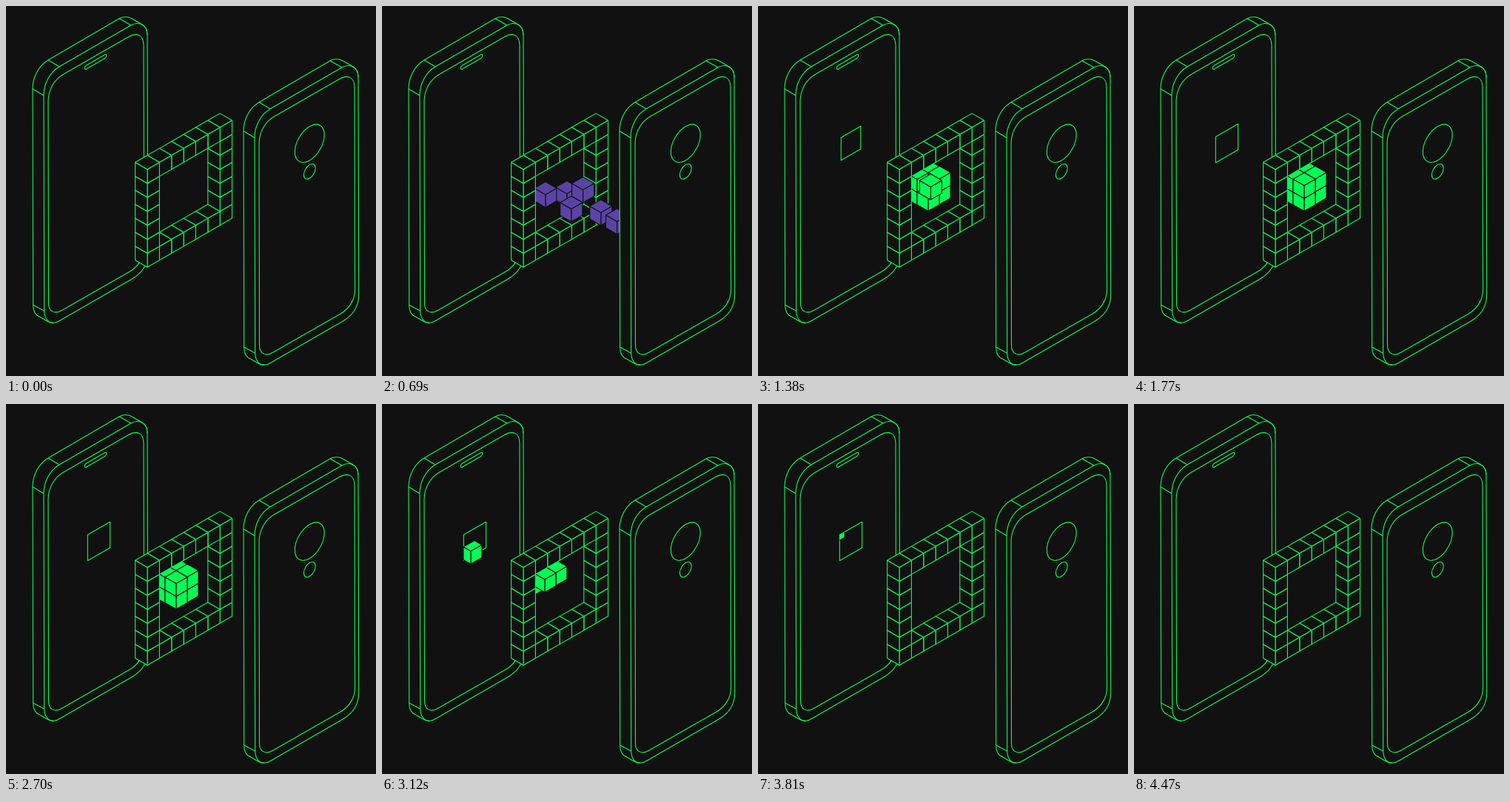
An HTML page with a canvas that plays this animation: 500 px wide and 500 px high, repeating every 4500 ms.

```html
<!DOCTYPE html>
<html lang="en">
<head>
<meta charset="utf-8">
<title>Cubes between two phones</title>
<style>
html, body { margin: 0; height: 100%; overflow: hidden; background: #111; }
canvas { display: block; width: 500px; height: 500px; }
</style>
</head>
<body>
<canvas id="stage" width="500" height="500"></canvas>
<script>
const ctx = document.getElementById('stage').getContext('2d');
const BG = '#111', GREEN = '#00ff55', PURPLE = '#5b43a6';
const LOOP = 4500, ISO = 1 / Math.sqrt(3), UNIT = 15;
const clamp = v => Math.min(1, Math.max(0, v));

const body = new Path2D('M36,112C36,96 44,81 57,73L153,17C158,14 165,14 170,17L184,25C189,28 191,33 191,39' +
  'L191.7,333C191.7,348 184,361 170,369L73,425C67,429 61,429 56,426L42,418C38,415 36.7,411 36.7,404Z');
const edges = new Path2D('M191,39C191,26 180,20 169,26L72,82C59,90 51,105 51,121L51.7,411C51.7,421 56,428 64,428' +
  'M57,73L72,82M153,17L169,26M36,112L51,121M36.7,404L51.7,412' +
  'M78,92L165,42C177,35 186,39 186,53L186.6,326C186.6,340 179,352 167,359L76,411' +
  'C66,417 57.5,413 57.5,402L57,129C57,114 65,99 78,92Z');

// column, row, layer, arrival time, arrival slowness, time of turning green, departure time, departure slowness
const cubes = [
  [1, 1, 1, 1200, 188, 1060, 2660, 151],
  [1, 1, 0, 1437, 177, 1200, 2660, 157],
  [1, 0, 1, 1467, 224, 1150, 2660, 186],
  [1, 0, 0, 1480, 169, 960, 2650, 218],
  [0, 1, 1, 942, 139, 940, 2660, 101],
  [0, 1, 0, 1264, 194, 1080, 2650, 153],
  [0, 0, 1, 1413, 167, 1180, 2660, 170],
  [0, 0, 0, 1730, 234, 1350, 2604, 239.5]
];

function face(fill, stroke, ...points) {
  ctx.beginPath();
  points.forEach(([x, y]) => ctx.lineTo(x, y));
  ctx.closePath();
  ctx.fillStyle = fill;
  ctx.strokeStyle = stroke;
  ctx.fill();
  ctx.stroke();
}

// (x, y) is the top corner of the near vertical edge
function box(x, y, w, depth, fill, stroke) {
  const k = w * ISO, e = 2 * k, bx = x - w * depth, by = y - k * depth;
  face(fill, stroke, [x, y], [x + w, y - k], [x + w, y - k + e], [x, y + e]);
  face(fill, stroke, [x, y], [bx, by], [bx, by + e], [x, y + e]);
  face(fill, stroke, [x, y], [x + w, y - k], [bx + w, by - k], [bx, by]);
}

function phone(x, y) {
  ctx.save();
  ctx.translate(x, y);
  ctx.fillStyle = BG;
  ctx.strokeStyle = GREEN;
  ctx.fill(body);
  ctx.stroke(body);
  ctx.stroke(edges);
  ctx.restore();
}

// Traces a path on the phone plane, centred on (x, y)
function onPlane(x, y, trace) {
  ctx.save();
  ctx.translate(x, y);
  ctx.transform(0.866, -0.5, 0, 1, 0, 0);
  ctx.beginPath();
  trace();
  ctx.restore();
}

function outline(x, y, trace) {
  onPlane(x, y, trace);
  ctx.strokeStyle = GREEN;
  ctx.stroke();
}

const circle = r => () => ctx.arc(0, 0, r, 0, 7);
const square = s => () => ctx.rect(-s / 2, -s / 2, s, s);

function frame(near) {
  for (let j = 6; j >= 0; j--)
    for (let i = 6; i >= 0; i--) {
      const rim = i % 6 === 0 || j % 6 === 0;
      if (rim && (i * j === 0) === near)
        box(191 + 16.36 * i, 220.7 - 9.45 * i + 18.9 * j, 16.36, 1, BG, GREEN);
    }
}

function cube([i, j, d, arrive, slowIn, turn, leave, slowOut], t) {
  const ahead = Math.min(150, (Math.max(0, arrive - t) / slowIn) ** 3);
  const gone = (Math.max(0, t - leave) / slowOut) ** 3;
  const x = 230 + UNIT * (i - d) + ahead - gone;
  const y = 242.6 + 0.555 * (x - 230) + 2 * UNIT * ISO * (j - i);
  const depth = clamp((x - 110 - UNIT * i) / UNIT);
  const color = t < turn ? PURPLE : GREEN;
  if (depth > 0) return box(x, y, UNIT, depth, color, BG);
  // Past the screen: seen only through the opening
  ctx.save();
  onPlane(125.5, 185.5, square(35));
  ctx.clip();
  box(x, y, UNIT, 1, color, BG);
  ctx.restore();
}

function portalSize(t) {
  if (t < 3000) return 1 - (1 - clamp((t - 990) / 780)) ** 3;
  return (1 + Math.cos(Math.PI * clamp((t - 3810) / 660))) / 2;
}

function draw(t) {
  ctx.fillStyle = BG;
  ctx.fillRect(0, 0, 500, 500);
  ctx.lineWidth = 1.1;
  ctx.lineJoin = 'round';

  phone(0, 0);
  outline(121, 75.5, () => ctx.roundRect(-17, -2.5, 34, 5, 2.5));
  const size = portalSize(t);
  if (size > 0.01) outline(125.5, 185.5, square(35 * size));

  frame(false);
  cubes.forEach(c => cube(c, t));
  frame(true);

  phone(285, 57);
  outline(410.3, 185.7, circle(23));
  outline(410.3, 223.7, circle(9.1));
}

const start = performance.now();
function tick() {
  draw((performance.now() - start) % LOOP);
  requestAnimationFrame(tick);
}
tick();
</script>
</body>
</html>
```
